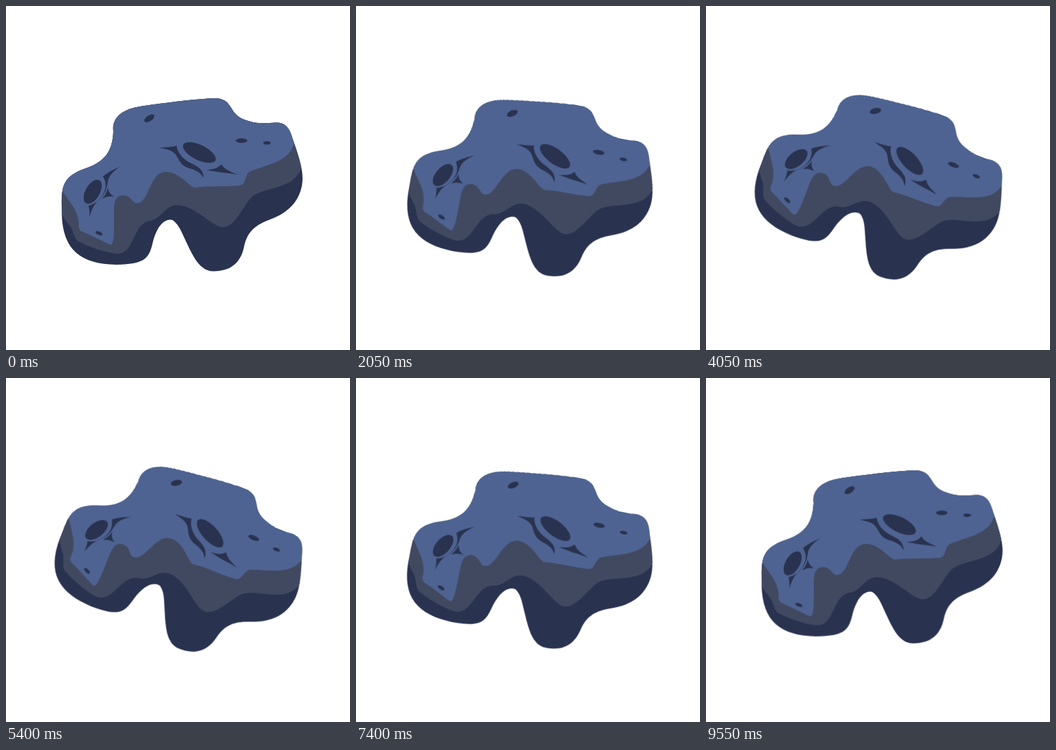
Animation, 500 px wide and 500 px high, one loop 9600 ms. Source, as an HTML page:

```html
<!DOCTYPE html>
<html lang="en">
<head>
<meta charset="utf-8">
<title>Drifting rock</title>
<style>
  html, body { margin: 0; width: 100%; height: 100%; overflow: hidden; background: #fff; }
  svg { display: block; width: 100vw; height: 100vh; }
  .dark { fill: #29324f; }
  .side { fill: #414961; }
  .top { fill: #4e6391; }
  #rock {
    transform-origin: 256px 260px;
    animation: sway 4800ms linear infinite alternate;
  }
  @keyframes sway {
    from { transform: rotate(0deg); }
    to { transform: rotate(25deg); }
  }
</style>
</head>
<body>
<svg viewBox="0 0 500 500">
  <defs>
    <path id="shape" d="M156 182
      C154 164 166 150 198 145.5 C230 141 268 136 300 134
      C334 133 320 159 352 167 C371 173 384 169 394 169.5
      C411 170 414 185 418 197 C426 220 431 236 431 250
      C431 278 414 300 382 311 C358 320 350 332 346 350
      C341 374 326 385 303 385.5 C278 387 268 354 254 326
      C247 313 242 310.5 239 310.5 C226 311 219 325 214 341
      C208 366 205 375 160 376 C110 375 82 356 81 301
      C81 268 78 250 113 237 C144 227 155 211 156 182Z"/>
    <clipPath id="edge"><use href="#shape"/></clipPath>
  </defs>
  <g id="rock">
    <use href="#shape" class="dark"/>

    <!-- Each layer fills everything above its lower rim. -->
    <g clip-path="url(#edge)">
      <path class="side" d="M440 200L430 233
        C419 270 372 261 355 280 C344 293 332 321 316 321.5
        C300 322 275 289 248 289.5 C231 290 227 308 211 312
        C183 314 189 362 160 360 C143 358 120 350 105 342
        C98 337 98 324 91 317 C86 311 82 306 74 290
        L60 100H450Z"/>
      <path class="top" d="M426 185L417 204
        C410 227 371 233 354 241 C346 246 350 260 339 261
        C315 263 295 261 275 264 C265 262 252 241 232 241
        C208 242 208 286 191 286.5 C183 287 182 275 170 275
        C155 276 157 292 157 312 C157 330 157 347 152 347
        C140 342 124 333 109 327 C103 322 108 317 104 306
        C101 293 90 282 83 270
        L60 230V100H450Z"/>
    </g>

    <g class="dark">
      <!-- Left crater -->
      <ellipse rx="19.3" ry="10.3" transform="translate(126 270) rotate(-60)"/>
      <path d="M166 233C157 240 150 245 148 255C147 267 141 278 132 285
        C127 290 124 298 121 307C122 301 121 295 120 290
        C130 288 138 281 142 272C146 264 146 256 141 248
        C148 241 157 238 166 233Z"/>
      <path d="M148 264C149 270 152 274 157 277C151 276 145 277 140 280
        C144 275 147 270 148 264Z"/>

      <!-- Right crater -->
      <ellipse rx="26" ry="11" transform="translate(281 213) rotate(26)"/>
      <path d="M223 206C232 205 242 205 248 203C249 213 256 221 266 227
        C276 232 288 237 287 250C283 241 274 238 264 235
        C253 231 251 222 246 215C240 209 232 208 223 206Z"/>
      <path d="M291 238C300 238 308 236 313 230C318 238 327 241 336 245
        C322 242 306 242 291 238Z"/>

      <!-- Pits -->
      <ellipse rx="8.3" ry="4.2" transform="translate(208.3 163.3) rotate(-33)"/>
      <ellipse rx="8.3" ry="3.4" transform="translate(342.3 195.7)"/>
      <ellipse rx="5.5" ry="2.4" transform="translate(379.3 199)"/>
      <ellipse rx="5.5" ry="2.5" transform="translate(135.3 330.3) rotate(23)"/>
    </g>
  </g>
</svg>
</body>
</html>
```
